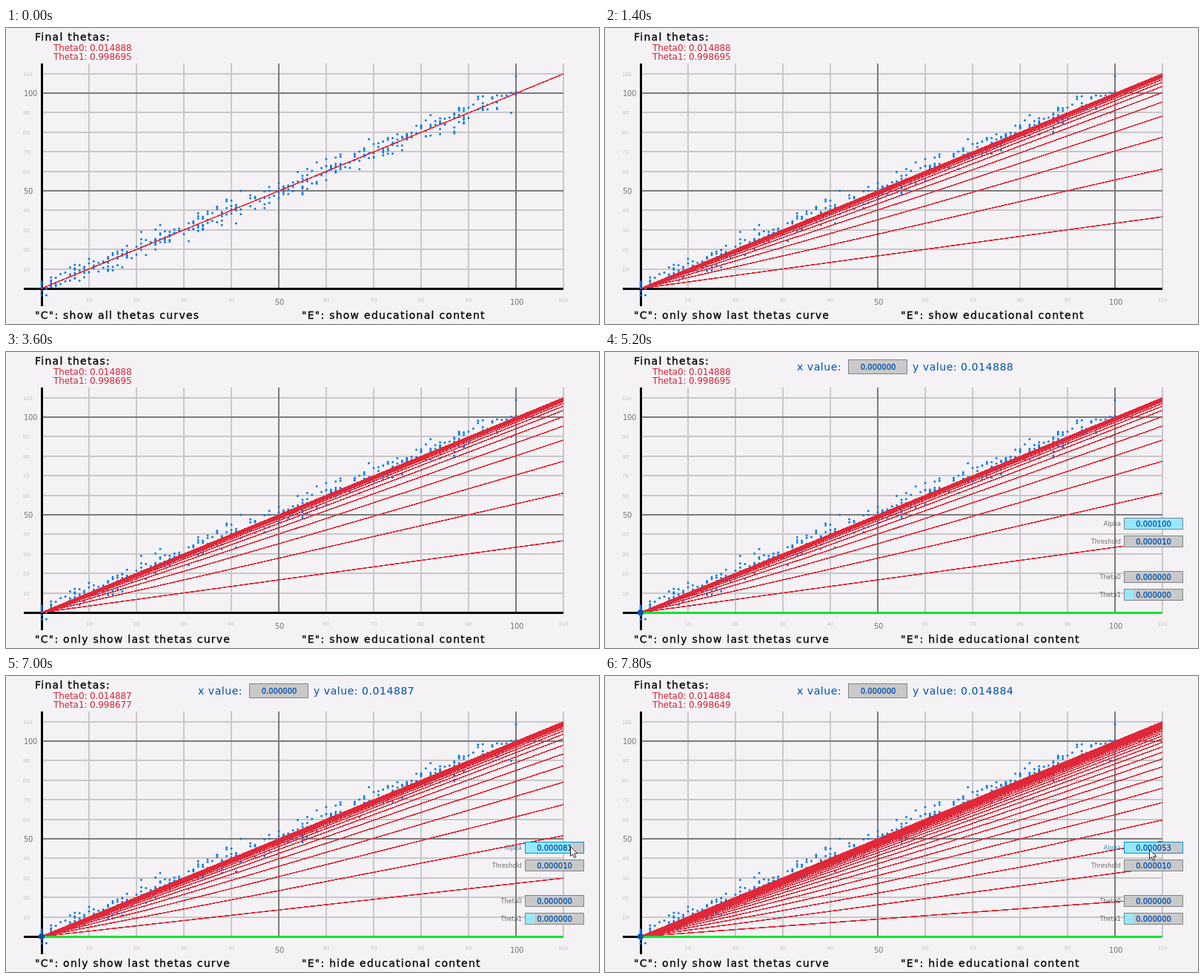
Write an HTML page that moves like this. It is 800 px wide and 400 px high and loops after 8000 ms.

```html
<!DOCTYPE html>
<html lang="en">
<head>
<meta charset="utf-8">
<title>Linear regression</title>
<style>
html, body { margin: 0; width: 100%; height: 100%; overflow: hidden; background: #f4f2f5; }
svg { display: block; width: 800px; height: 400px; }
text { font-family: "DejaVu Sans", sans-serif; white-space: pre; }
.title { font-size: 14px; letter-spacing: 1.25px; stroke: #000; stroke-width: .3px; }
.theta { font-size: 12px; letter-spacing: -.1px; fill: #d42536; }
.value { font-size: 14px; letter-spacing: .55px; fill: #0052ac; }
.minor { font: 8px "Liberation Sans", sans-serif; fill: #c4c4c6; }
.major { font-size: 10px; letter-spacing: -.3px; fill: #777; }
.label { font-size: 8px; letter-spacing: .1px; fill: #686868; text-anchor: end; }
.box { font-size: 10px; fill: #0052ac; stroke: #0052ac; stroke-width: .3px; text-anchor: middle; }
.mid { text-anchor: middle; }
.crisp { shape-rendering: crispEdges; }
</style>
</head>
<body>
<svg id="stage" viewBox="0 0 800 400"></svg>
<script>
const stage = document.getElementById('stage');
const LOOP = 8000, SLOPE = 0.9987, RATE = 0.334;
const px = x => 48 + 6.4 * x;
const py = y => 352 - 2.64 * y;

function add(parent, tag, attrs, content) {
  const el = document.createElementNS('http://www.w3.org/2000/svg', tag);
  for (const key in attrs) el.setAttribute(key, attrs[key]);
  if (content !== undefined) el.textContent = content;
  parent.append(el);
  return el;
}
const label = (parent, cls, x, y, str) => add(parent, 'text', { class: cls, x, y }, str);
const rect = (parent, x, y, width, height, fill) =>
  add(parent, 'rect', { class: 'crisp', x, y, width, height, fill });

function drawGrid() {
  for (const major of [false, true]) {
    for (let v = 10; v <= 110; v += 10) {
      if ((v % 50 === 0) !== major) continue;
      const color = major ? '#7b7b7d' : '#c8c8c9';
      const x = Math.round(px(v)), y = Math.round(py(v));
      rect(stage, x - 1, 48, 2, 304, color);
      rect(stage, 48, y - 1, 704, 2, color);
      const cls = major ? 'major' : 'minor';
      label(stage, cls, major ? 24 : 23, y + (major ? 4 : 3), v);
      label(stage, cls + ' mid', x + (major ? 1 : 0), major ? 374 : 370, v);
    }
  }
  rect(stage, 24, 351, 728, 3, '#000');
  rect(stage, 47, 48, 3, 328, '#000');
}

function drawPoints() {
  let seed = 20;
  const random = () => {
    seed = (seed * 1664525 + 1013904223) % 4294967296;
    return seed / 4294967296;
  };
  const dot = (x, y) => `M${px(x) - 1.5} ${py(y)}a1.5 1.5 0 1 0 3 0a1.5 1.5 0 1 0 -3 0`;
  let d = dot(100, 108.7) + dot(42, 50) + dot(21, 29) + dot(99, 90) + dot(41, 33.3) + dot(25, 32.5);
  for (let i = 0; i < 400; i++) {
    const x = Math.floor(random() * 101);
    const noise = (random() + random() + random() + random() - 2) * 4.9;
    d += dot(x, Math.max(-3.8, x + noise));
  }
  add(stage, 'path', { d, fill: '#0079e6' });
}

// Each descent step closes a fixed share of the gap to the fitted slope.
function curves(alpha) {
  const ratio = 1 - RATE * alpha;
  let d = '';
  for (let gap = ratio; gap > 1e-5; gap *= ratio)
    d += `M48 352L752 ${py(110 * SLOPE * (1 - gap)).toFixed(2)}`;
  return d;
}

function slider(parent, name, y, value, fill) {
  const caption = label(parent, 'label', 696, y + 11, name);
  const border = rect(parent, 700, y, 80, 16, '#838383');
  rect(parent, 701, y + 1, 78, 14, '#c9c9c9');
  const bar = rect(parent, 701, y + 1, 78 * fill, 14, '#97e8ff');
  const text = label(parent, 'box', 740, y + 11.5, value);
  return { caption, border, bar, text };
}

drawGrid();
drawPoints();
const fan = add(stage, 'path', { class: 'crisp', fill: 'none', stroke: '#e02838', 'stroke-width': 1.6 });

label(stage, 'title', 39, 17, 'Final thetas:');
const theta0 = label(stage, 'theta', 64, 31, '');
const theta1 = label(stage, 'theta', 64, 43, '');
const curveHint = label(stage, 'title', 39, 393, '');
const eduHint = label(stage, 'title', 399, 393, '');

const edu = add(stage, 'g', {});
rect(edu, 48, 351, 704, 3, '#00e430');
add(edu, 'circle', { cx: 48, cy: 352, r: 4, fill: '#0052ac' });
label(edu, 'value', 259, 25, 'x value:');
rect(edu, 328, 10, 80, 20, '#838383');
rect(edu, 329, 11, 78, 18, '#c9c9c9');
label(edu, 'box', 368.5, 24, '0.000000');
const yValue = label(edu, 'value', 415, 25, '');
const alphaBar = slider(edu, 'Alpha', 224, '0.000100', 1);
slider(edu, 'Threshold', 248, '0.000010', 0);
slider(edu, 'Theta0', 296, '0.000000', 0);
slider(edu, 'Theta1', 320, '0.000000', 0.155);
const cursor = add(edu, 'path', {
  d: 'M0 0V13L3 10.2L5.2 15.2L7.4 14.2L5.2 9.4H9.4Z', fill: '#fff', stroke: '#222', 'stroke-width': 1
});

// Start time, slider colours, relative alpha, fitted thetas, pointer tip.
const looks = {
  normal: ['#686868', '#838383', '#97e8ff'],
  focused: ['#6c9bbc', '#5bb2d9', '#6c9bbc'],
  pressed: ['#368baf', '#0492c7', '#97e8ff']
};
const steps = [
  { at: 0, look: 'normal', alpha: 1, t0: '0.014888', t1: '0.998695' },
  { at: 6400, look: 'focused', alpha: 1, t0: '0.014888', t1: '0.998695', tip: [772, 236] },
  { at: 6600, look: 'focused', alpha: 1, t0: '0.014888', t1: '0.998695', tip: [769, 230] },
  { at: 6800, look: 'pressed', alpha: 1, t0: '0.014888', t1: '0.998695', tip: [768, 230] },
  { at: 7000, look: 'pressed', alpha: 0.814, t0: '0.014887', t1: '0.998677', tip: [761.5, 230.5] },
  { at: 7200, look: 'pressed', alpha: 0.78, t0: '0.014886', t1: '0.998682', tip: [758.5, 231.5] },
  { at: 7400, look: 'pressed', alpha: 0.739, t0: '0.014884', t1: '0.998698', tip: [753.5, 232.5] },
  { at: 7600, look: 'pressed', alpha: 0.64, t0: '0.014884', t1: '0.998664', tip: [745, 233.5] },
  { at: 7800, look: 'pressed', alpha: 0.532, t0: '0.014884', t1: '0.998649', tip: [734.5, 234.5] }
];

const show = (el, on) => el.setAttribute('visibility', on ? 'inherit' : 'hidden');

function render(time) {
  const step = steps.findLast(s => s.at <= time);
  const all = (time >= 400 && time < 2200) || time >= 3600;
  const open = time >= 5200;
  const [textColor, edge, fill] = looks[step.look];

  fan.setAttribute('d', all ? curves(step.alpha) : `M48 352L752 ${py(110 * SLOPE)}`);
  theta0.textContent = 'Theta0: ' + step.t0;
  theta1.textContent = 'Theta1: ' + step.t1;
  yValue.textContent = 'y value: ' + step.t0;
  curveHint.textContent = all ? '"C": only show last thetas curve' : '"C": show all thetas curves';
  eduHint.textContent = `"E": ${open ? 'hide' : 'show'} educational content`;

  show(edu, open);
  show(cursor, open && step.tip);
  if (step.tip) cursor.setAttribute('transform', `translate(${step.tip})`);
  alphaBar.caption.style.fill = textColor;
  alphaBar.border.setAttribute('fill', edge);
  alphaBar.bar.setAttribute('fill', fill);
  alphaBar.bar.setAttribute('width', 78 * step.alpha);
  alphaBar.text.textContent = (step.alpha / 10000).toFixed(6);
}

let start, last;
function tick(now) {
  start ??= now;
  const slot = Math.floor(((now - start) % LOOP) / 200);
  if (slot !== last) render((last = slot) * 200);
  requestAnimationFrame(tick);
}
render(0);
requestAnimationFrame(tick);
</script>
</body>
</html>
```
